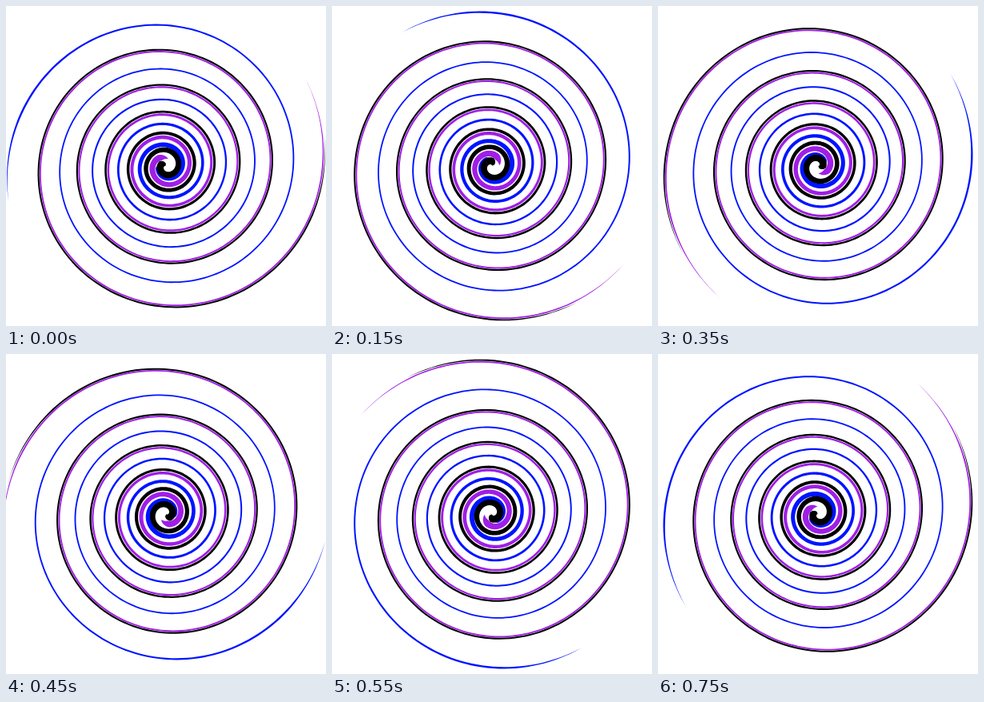
An HTML page with a canvas for the animation above (0.8 s loop, 400 by 400 pixels).

```html
<!DOCTYPE html>
<html>
<head>
<meta charset="utf-8">
<style>
html, body { margin: 0; height: 100%; overflow: hidden; background: #fff; }
canvas { display: block; width: 400px; height: 400px; }
</style>
</head>
<body>
<canvas width="400" height="400"></canvas>
<script>
const ctx = document.querySelector('canvas').getContext('2d');
const LOOP = 800, STEPS = 16, TAU = Math.PI * 2;
const { exp, cos, sin, min, floor } = Math;

// Spiral radius after u turns inward from the rim.
const radius = u => 241 * exp(-0.235 * u) - 58.6 + 15.6 * exp(-3 * u);

// start/end in turns; inset pulls the arm inward; width is its thickness.
const arms = [
  { color: '#0014ff', phase: 0.5, start: -0.036, end: 5.12,
    inset: u => 4.5 * exp(1.1 * (u - 4.4)),
    width: u => 1.6 + exp(-4 * u) + 4.5 * exp(u - 4.3) },
  { color: '#a01ee6', phase: 0, start: -0.088, end: 4.8,
    inset: u => 2 + 6.5 * exp(0.8 * (u - 4.5)),
    width: u => 1.7 + 4 * exp(0.9 * (u - 4.1)) },
  { color: '#000', phase: 0, start: -0.032, end: 5.75,
    inset: u => 0.5 * exp(1.5 * (u - 5)),
    width: u => 1.9 + 3.3 * exp(0.8 * (u - 4.4)) }
];

function armPath({ phase, start, end, inset, width }) {
  const path = new Path2D();
  const edge = (u, side) => {
    const taper = min(1, (u - start) / 0.09, (end - u) / 0.15);
    const r = radius(u) - inset(u) + side * width(u) * taper / 2;
    const a = (u + phase) * TAU;
    path.lineTo(r * cos(a), r * sin(a));
  };
  const n = 900, at = i => start + (end - start) * i / n;
  for (let i = 0; i <= n; i++) edge(at(i), 1);
  for (let i = n; i >= 0; i--) edge(at(i), -1);
  path.closePath();
  return path;
}

for (const arm of arms) arm.path = armPath(arm);

function draw(now) {
  const step = floor(now % LOOP / LOOP * STEPS);
  ctx.setTransform(1, 0, 0, 1, 0, 0);
  ctx.fillStyle = '#fff';
  ctx.fillRect(0, 0, 400, 400);
  ctx.translate(200, 200);
  ctx.rotate(step / STEPS * TAU);
  for (const { color, path } of arms) {
    ctx.fillStyle = color;
    ctx.fill(path);
  }
  requestAnimationFrame(draw);
}
draw(performance.now());
</script>
</body>
</html>
```
